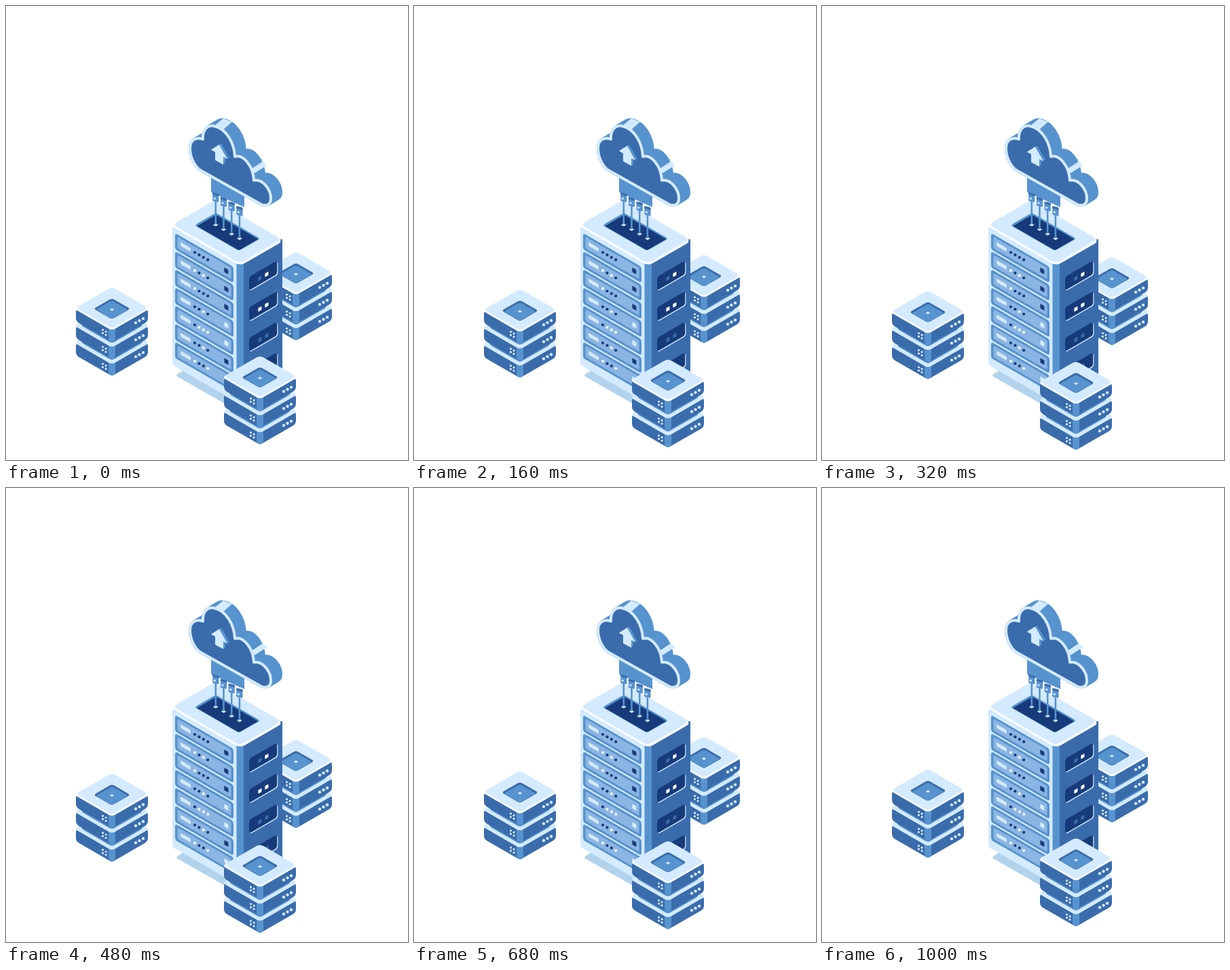
Recreate the animation shown at these times as an HTML page. Size 592 by 668 pixels, loop 1040 ms.

```html
<!DOCTYPE html>
<html lang="en">
<head>
<meta charset="utf-8">
<title>Cloud servers</title>
<style>
  html, body { margin: 0; width: 100%; height: 100%; overflow: hidden; background: #fff; }
  svg { display: block; width: 100vw; height: 100vh; }
</style>
</head>
<body>
<svg id="stage" viewBox="0 0 592 668"></svg>
<script>
const LIGHT = '#d4eaff', PALE = '#8bb5e2', MID = '#5793cf', DARK = '#3a6cac', NAVY = '#173b7a';
const K = Math.tan(Math.PI / 6);
const LOOP = 1040, STEP = 40, PEAK = 500;

// Polygon whose corners are rounded over r pixels of each edge
function poly(pts, fill, r = 0, extra = '') {
  const toward = ([x, y], [u, v]) => {
    const f = r / Math.hypot(u - x, v - y);
    return [x + (u - x) * f, y + (v - y) * f];
  };
  const n = pts.length;
  const d = pts.map((p, i) => {
    const a = toward(p, pts[(i + n - 1) % n]), b = toward(p, pts[(i + 1) % n]);
    return `${i ? 'L' : 'M'}${a}Q${p} ${b}`;
  }).join('');
  return `<path d="${d}Z" fill="${fill}" ${extra}/>`;
}

// Isometric planes, each measured from its left corner
const flat = (x, y, w, d) => [[x, y], [x + d, y - d * K], [x + d + w, y + (w - d) * K], [x + w, y + w * K]];
const face = (x, y, w, h, k = K) => [[x, y], [x + w, y + w * k], [x + w, y + w * k + h], [x, y + h]];
const diamond = (y, s) => flat(-s, y, s, s);
const dot = (x, y, r, fill) => `<circle cx="${x}" cy="${y}" r="${r}" fill="${fill}"/>`;
const rect = (x, y, w, h, fill) => `<rect x="${x}" y="${y}" width="${w}" height="${h}" fill="${fill}"/>`;
const repeat = (n, fn) => Array.from({ length: n }, (_, i) => fn(i)).join('');

function slab(y, top) {
  let s = poly([[-53, y], [0, y + 30], [53, y], [53, y + 18.4], [0, y + 49], [-53, y + 18.4]], DARK, 5);
  s += poly([[-5, y + 25], [5, y + 25], [5, y + 46.1], [0, y + 49], [-5, y + 46.1]], MID, 2.5);
  s += poly(diamond(y, 55.4), top ? '#fff' : LIGHT, 6);
  if (top) s += poly(diamond(y - 1.6, 53), LIGHT, 6);
  s += repeat(4, i => dot(-13.5 + (i % 2) * 4.6, y + 31 + (i % 2) * 2.6 + (i >> 1) * 4.8, 1.6, LIGHT));
  s += repeat(3, i => dot(35 + i * 5.5, y + 20.6 - i * 3.1, 2.2, LIGHT));
  return s;
}

function stack(id, x, y) {
  let s = '';
  for (const level of [50, 25]) {
    s += slab(level, false);
    s += poly([[-45, level - 12], [45, level - 12], [45, level], [0, level + 26], [-45, level]], MID, 4);
  }
  s += slab(0, true);
  s += poly(diamond(0, 27), DARK, 4) + poly(diamond(1.4, 23.6), MID, 3) + poly(diamond(1, 3.4), LIGHT, .5);
  return `<g transform="translate(${x} ${y})"><g id="${id}">${s}</g></g>`;
}

function rack() {
  let s = poly([[249, 543.5], [266, 533.5], [352, 583], [352, 602]], '#b3d3ec', 5);
  s += poly(face(245, 324, 100, 204), LIGHT, 4);
  s += poly(face(339.5, 372, 12, 214), MID);
  s += poly(face(350, 375, 57, 206, -K), DARK, 3);
  s += poly(flat(244, 324, 101, 63), '#fff', 8);
  s += poly(flat(245.5, 321.5, 99, 61.5), LIGHT, 8);

  // Opening in the lid
  s += poly(flat(277.5, 322.5, 65.5, 31.5), MID, 4);
  s += poly(flat(281, 323.7, 62, 28.5), NAVY, 2);

  // Drawer lamps: 1 is lit
  const lamps = ['0000', '1010', '1000', '0010', '0111', '0010', '1001'];
  const lit = [0, 0, 0, 1, 1, 0, 1];
  lamps.forEach((row, i) => {
    const y = 334 + i * 26.65;
    s += poly(face(249, y, 86, 24), MID, 4);
    s += poly(face(252.5, y + 5.5, 79, 17), PALE, 2.5);
    s += poly(face(257, y + 13.5, 15, 5.5), LIGHT, 2);
    [...row].forEach((on, j) => s += dot(278 + j * 6.4, y + 28.6 + j * 3.6, 2.1, +on ? '#f2f9ff' : NAVY));
    s += poly(face(321.4, y + 50.8, 6, 6.6), lit[i] ? LIGHT : NAVY, .5);
  });

  const vents = [[DARK, '#fff'], ['#fff', '#fff'], [DARK, DARK], [DARK, DARK]];
  vents.forEach((pair, i) => {
    const y = 399 + i * 45;
    s += poly(face(359, y + .4, 41.4, 20, -K), LIGHT, 4);
    s += poly(face(358, y - .6, 41.2, 20, -K), NAVY, 4);
    pair.forEach((c, j) => s += poly(face(371.4 + j * 10, y + .6 - j * 6, 5, 5.4, -K), c));
  });
  return s;
}

function cables() {
  let s = poly([[302, 246], [351, 274], [351, 296], [302, 274]], MID, 1);
  return s + repeat(4, i => {
    const x = 308.8 + i * 11.7, y = 275 + i * 6.7;
    return poly(flat(x - 4, y + 47, 4, 4), LIGHT, 1) +
      rect(x - 1.3, y + 13, 2.6, 33.5, MID) +
      poly(face(x - 4.6, y - .8, 9.2, 13, .2), MID, 1.5) +
      poly(face(x - 4.6, y - .8, 9.2, 3, .3), DARK, .5) +
      rect(x - 3, y + 7, 3, 2.6, LIGHT);
  });
}

function cloud() {
  const d = 'M286 241.5C278 236 271 223 271 209C271 198 279 192 290 196C289 182 297 174 308 177' +
    'C323 181 336 199 337 221.5C350 218 364 236 365 256.5C378 254 390 270 390 283C390 292 384 295 376 292Z';
  const part = (fill, line, dx, dy) => `<path d="${d}" transform="translate(${dx} ${dy})" fill="${fill}"
    stroke="${line}" stroke-width="4" stroke-linejoin="round"/>`;
  const sides = repeat(16, i => part(MID, MID, 15 - i, -9 + i * .6));
  const stripes = poly([[306, 177], [320, 182], [333, 170.5], [320, 165.5]], LIGHT) +
    poly([[361, 240], [366, 246], [384, 234.5], [379, 228]], LIGHT);
  const arrow = [[314, 204], [326.2, 225.6], [320, 222], [320, 233.4], [308, 226.8], [308, 215], [301.8, 211.6]];
  const depth = repeat(4, i => poly(arrow.map(([x, y]) => [x + 3 - i * .8, y - 1.6 + i * .4]), MID));
  return sides + stripes + part(DARK, LIGHT, 0, 0) +
    `<g id="arrow">${depth}${poly(arrow, LIGHT, .5)}</g>`;
}

document.getElementById('stage').innerHTML =
  stack('right', 427, 393.5) + rack() + cables() + cloud() +
  stack('left', 156, 445.5) + stack('front', 374, 546.5);

const travel = Object.entries({ right: 8.3, left: 5.9, front: 9.6, arrow: 3.6 })
  .map(([id, px]) => [document.getElementById(id), px]);

// Drops with a sine ease, then rises with a quadratic ease
const drop = t => t < PEAK
  ? Math.sin(Math.PI / 2 * t / PEAK)
  : ((LOOP - t) / (LOOP - PEAK)) ** 2;

const start = performance.now();
function draw() {
  const t = Math.floor((performance.now() - start) % LOOP / STEP) * STEP;
  for (const [el, px] of travel) el.setAttribute('transform', `translate(0 ${(drop(t) * px).toFixed(2)})`);
  requestAnimationFrame(draw);
}
draw();
</script>
</body>
</html>
```
